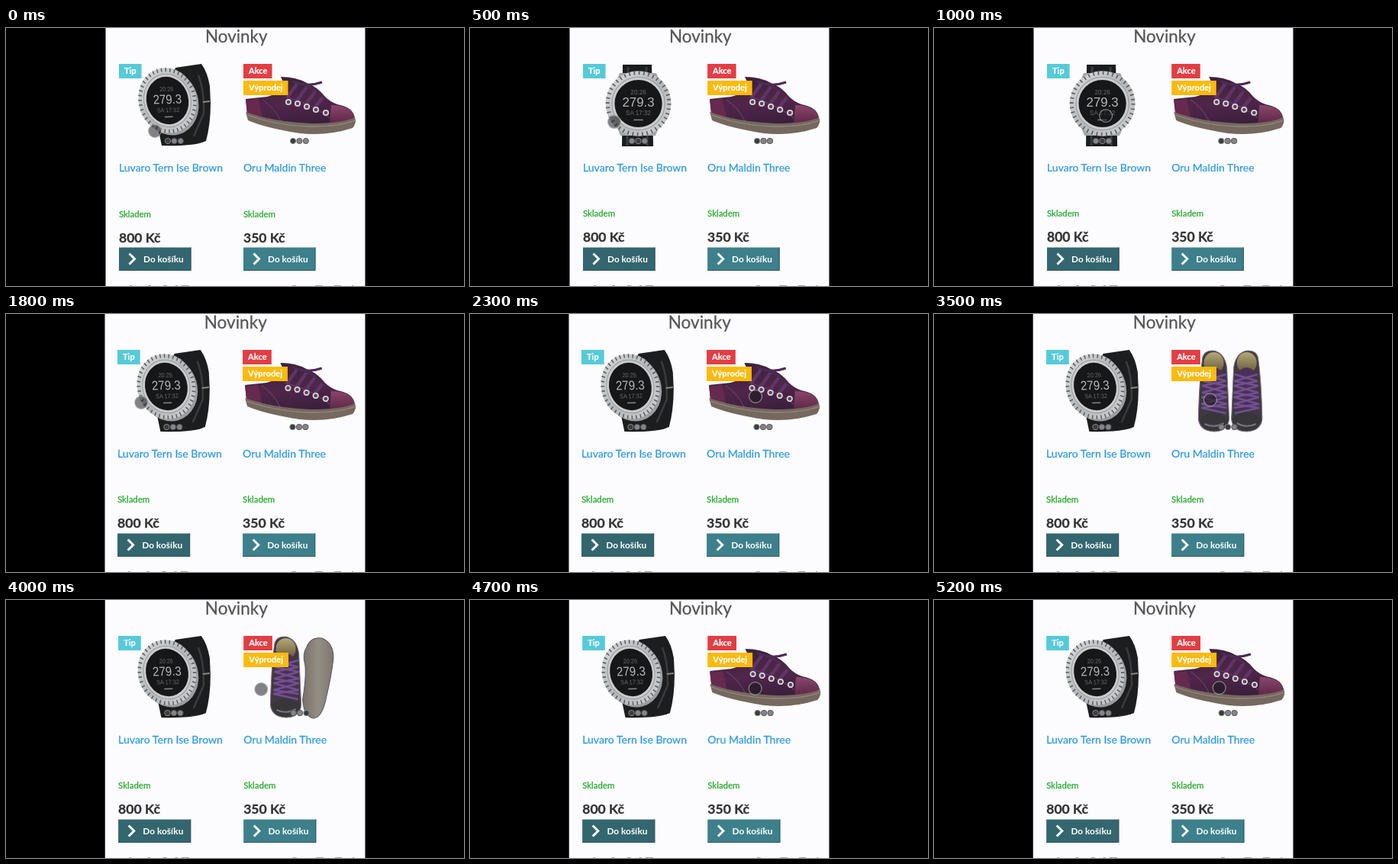
An HTML page for the animation above (5300 ms loop, 600 by 338 pixels).

```html
<!DOCTYPE html>
<html lang="cs">
<head>
<meta charset="utf-8">
<style>
  html, body { margin: 0; width: 100%; height: 100%; overflow: hidden; background: #000; }
  svg { display: block; width: 600px; height: 338px; font-family: Lato, sans-serif; }
  #page { filter: blur(.4px); }
  .title { font-size: 22.4px; fill: #555; stroke: #555; stroke-width: .25; }
  .name { font-size: 14px; fill: #2f9bdf; stroke: #2f9bdf; stroke-width: .25; }
  .stock { font-size: 11.4px; fill: #25a82a; stroke: #25a82a; stroke-width: .25; }
  .price { font-size: 17.5px; font-weight: 700; fill: #333; stroke: #333; stroke-width: .3; }
  .order { font-size: 11.8px; font-weight: 700; fill: #fff; }
  .tag { font-size: 11px; font-weight: 700; fill: #fff; stroke: #fff; stroke-width: .2; }
  .lcd { font-family: "Liberation Sans", Arial, sans-serif; fill: #b4b9bb; text-anchor: middle; }
  .lcd .small { font-size: 8px; fill: #666c6f; }
  .lcd .big { font-size: 16.5px; }
</style>
</head>
<body>
<svg viewBox="0 0 600 338">
  <defs>
    <linearGradient id="steel" x2="1" y2="1">
      <stop stop-color="#dcdee0"/><stop offset=".5" stop-color="#b5b8ba"/><stop offset="1" stop-color="#d0d2d4"/>
    </linearGradient>
    <linearGradient id="suede" x2=".3" y2="1">
      <stop stop-color="#372039"/><stop offset=".6" stop-color="#50264b"/><stop offset="1" stop-color="#3b1f3c"/>
    </linearGradient>
    <linearGradient id="toe" x2="0" y2="1">
      <stop stop-color="#8a476c"/><stop offset="1" stop-color="#5c2445"/>
    </linearGradient>
    <linearGradient id="lining" x2="0" y2="1">
      <stop stop-color="#b5a877"/><stop offset="1" stop-color="#615739"/>
    </linearGradient>
    <linearGradient id="sole" x2="1">
      <stop stop-color="#77716a"/><stop offset=".5" stop-color="#948e85"/><stop offset="1" stop-color="#7d776f"/>
    </linearGradient>

    <g id="dial">
      <circle r="42" fill="url(#steel)"/>
      <circle r="39.5" fill="none" stroke="#5f6265" stroke-width="5" stroke-dasharray="1.7 4.5"/>
      <circle r="34" fill="#c9cbcd" stroke="#97999c"/>
      <circle r="30.5" fill="#151718"/>
      <g class="lcd">
        <text class="small" y="-12">20:26</text>
        <text class="big" y="4">279.3</text>
        <text class="small" y="15">SA 17:32</text>
        <path d="M-6 21H6" stroke="#888" stroke-width="1.5"/>
      </g>
    </g>

    <g id="watchSide">
      <path d="M222 52L256 47Q264 58 267 76L268 98Q268 126 262 148Q248 155 204 154L199 130Z" fill="#1c1d1f"/>
      <path d="M252 62Q260 82 259 112L246 142" fill="none" stroke="#393b3e" stroke-width="2.5"/>
      <path d="M258 97l9-1" stroke="#85888b" stroke-width="2"/>
      <ellipse cx="215" cy="98" rx="37" ry="43" transform="rotate(-16 215 98)" fill="#9a9da0"/>
      <use href="#dial" transform="translate(211.5 95) rotate(-16) scale(.9 1.03) rotate(13)"/>
    </g>

    <g id="watchFront">
      <path d="M200 48H238L240 155H199Z" fill="#1b1c1e"/>
      <path d="M207 51V65M231 51V65M206 137V154M232 137V154" stroke="#393b3e" stroke-width="3"/>
      <path d="M196 59H244L251 76H189ZM189 121H251L243 141H197Z" fill="#a2a6a9"/>
      <use href="#dial" transform="translate(220.5 99) scale(1.02)"/>
    </g>

    <g id="shoeSide">
      <path d="M314 93L342 90 368 82 360 64Q380 64 394 72Q408 77 418 90Q425 97 434 100Q456 104 457 119L410 130Q360 128 316 113Z" fill="url(#suede)"/>
      <path d="M426 101Q455 101 457 120L424 126Z" fill="url(#toe)"/>
      <path d="M314 95L331 93 336 118 316 112Z" fill="#67294e"/>
      <path d="M336 94Q352 105 360 122M366 90Q402 100 424 118" fill="none" stroke="#69406a"/>
      <path d="M368 92L382 72M380 97L394 77M392 101L405 83M404 105L415 91" stroke="#5f3564" stroke-width="4.5"/>
      <path d="M376 70Q394 78 414 71M392 75L407 83" fill="none" stroke="#4d2b54" stroke-width="3"/>
      <path d="M314 110Q350 123 400 125Q440 125 457 117Q460 124 454 131Q420 142 385 138Q340 131 317 121Z" fill="#75685f"/>
      <path d="M316 114Q355 128 400 129Q438 129 457 121" fill="none" stroke="#968a80" stroke-width="1.3"/>
      <g id="eyelets" fill="#57445a" stroke="#d9d3da" stroke-width="1.8"></g>
    </g>

    <g id="shoeTop">
      <path d="M351 60Q352 48 365 48Q380 50 383 70L386 138Q384 154 366 154Q348 153 346 138Q347 90 351 60Z" fill="#403844" stroke="#7d757d"/>
      <ellipse cx="366" cy="64" rx="13" ry="14" fill="url(#lining)"/>
      <path d="M354 78Q366 62 379 78L380 126H354Z" fill="#4a3056"/>
      <path d="M348 137Q366 121 385 137Q383 152 366 153Q350 151 348 137Z" fill="#38363b"/>
      <path d="M354 144Q366 150 379 143" fill="none" stroke="#77747a" stroke-width="2"/>
      <path d="M352 79L382 88 351 94 383 103 350 109 383 118 350 123 382 130M382 79L352 88 383 94 351 103 383 109 350 118 383 123" fill="none" stroke="#715090" stroke-width="2.6"/>
    </g>
    <g id="shoePair">
      <use href="#shoeTop"/><use href="#shoeTop" transform="translate(775) scale(-1 1)"/>
    </g>
    <g id="shoeSole">
      <use href="#shoeTop"/>
      <path d="M393 62Q398 48 413 50Q428 56 428 76Q425 102 419 126Q414 154 402 155Q389 152 388 130Q393 100 391 84Q387 72 393 62Z" fill="url(#sole)" stroke="#5b5358"/>
    </g>
  </defs>

  <g id="page">
    <rect x="130.5" width="345" height="338" fill="#fcfbfe"/>
    <text class="title" x="261" y="18.5">Novinky</text>
    <g id="cards"></g>
    <g id="tags"></g>
    <path d="M162 337.8h3M186 337.8h4M206 337.8h5M222 337.8h3M230 337.8h10M375 337.8h5M405 337.8h10M430 337.8h9M453 337.8h2" stroke="#888"/>
    <circle id="touch" r="8.4" fill="#1a1a1e" fill-opacity=".54" stroke="#aaa" stroke-opacity=".75" stroke-width="1.2"/>
  </g>
  <path d="M0 0H129.5V338H0ZM470.5 0H600V338H470.5Z"/>
</svg>
<script>
const $ = id => document.getElementById(id);
const LOOP = 5300, STEP = 100;

// swipes: [time, slide index shown from then on]
const products = [
  { x: 148, dots: 212, name: 'Luvaro Tern Ise Brown', price: '800 Kč', color: '#34666f',
    slides: ['watchSide', 'watchFront'], swipes: [[0, 0], [300, 1], [1500, 0]] },
  { x: 311, dots: 376, name: 'Oru Maldin Three', price: '350 Kč', color: '#3d808c',
    slides: ['shoeSide', 'shoePair', 'shoeSole'], swipes: [[0, 0], [2500, 1], [3600, 2], [4400, 0]] }
];

// [time, x, y]: each swipe goes left, then the finger returns to the middle
const touchPath = [
  [0, 195, 135], [300, 180, 125], [1000, 225, 115], [1300, 225, 115], [1600, 179, 116],
  [1800, 179, 116], [2200, 385, 108], [2500, 345, 108], [2900, 389, 105], [3300, 389, 108],
  [3700, 334, 117], [4000, 334, 117], [4200, 373, 116], [4400, 345, 116], [4700, 373, 116], [5300, 373, 115]
];
// [time, horizontal zoom, shift]
const cameraPath = [[0, 0, 0], [1000, .001, .2], [1300, .0066, -1], [2400, .0066, -1],
  [2700, .0066, 0], [5300, .0066, .2]];

const ease = p => p * p * (3 - 2 * p);

function sample(path, t) {
  const i = path.findIndex(key => key[0] > t);
  const a = path[i - 1], b = path[i];
  const p = ease((t - a[0]) / (b[0] - a[0]));
  return a.slice(1).map((v, k) => v + (b[k + 1] - v) * p);
}

function tag(x, y, width, color, label) {
  return `<rect x="${x}" y="${y}" width="${width}" height="19" fill="${color}"/>
    <text class="tag" x="${x + 7}" y="${y + 13.4}">${label}</text>`;
}

$('eyelets').innerHTML = [[370, 97], [382, 99], [394, 103], [406, 107], [419, 111]]
  .map(([x, y]) => `<circle cx="${x}" cy="${y}" r="3.2"/>`).join('');

$('cards').innerHTML = products.map(({ x, dots, name, price, color }, i) => `
  <use id="slide${i}"/>
  <g id="dots${i}">${[0, 1, 2].map(k => `<circle cx="${dots + k * 8.4}" cy="148" r="3.6"/>`).join('')}</g>
  <text class="name" x="${x}" y="188">${name}</text>
  <text class="stock" x="${x}" y="247.5">Skladem</text>
  <text class="price" x="${x}" y="280.5">${price}</text>
  <rect x="${x}" y="287.5" width="94.5" height="30.5" fill="${color}"/>
  <path d="M${x} 317.5h94v-30" fill="none" stroke="#2c5965"/>
  <path d="M${x + 13.5} 295.5l7 7-7 7" fill="none" stroke="#fff" stroke-width="3"/>
  <text class="order" x="${x + 32}" y="307">Do košíku</text>`).join('');

$('tags').innerHTML = tag(148, 47, 29.5, '#55cad9', 'Tip') +
  tag(311, 47, 37.5, '#e23e43', 'Akce') + tag(311, 69, 58.5, '#fbba0c', 'Výprodej');

function drawCarousel({ slides, swipes }, i, t) {
  const active = swipes.filter(([time]) => time <= t).pop()[1];
  $('slide' + i).setAttribute('href', '#' + slides[active]);
  [...$('dots' + i).children].forEach((dot, k) => {
    dot.setAttribute('fill', k === active ? '#3c3c40' : '#858589');
    dot.setAttribute('stroke', k === active ? '#858589' : '#58585c');
  });
}

function draw(now) {
  const t = Math.floor(now % LOOP / STEP) * STEP;
  products.forEach((product, i) => drawCarousel(product, i, t));
  const [zoom, shift] = sample(cameraPath, t);
  $('page').setAttribute('transform', `translate(${shift - 300 * zoom}) scale(${1 + zoom} 1)`);
  const [x, y] = sample(touchPath, t);
  $('touch').setAttribute('transform', `translate(${x} ${y})`);
  requestAnimationFrame(draw);
}
draw(0);
</script>
</body>
</html>
```
